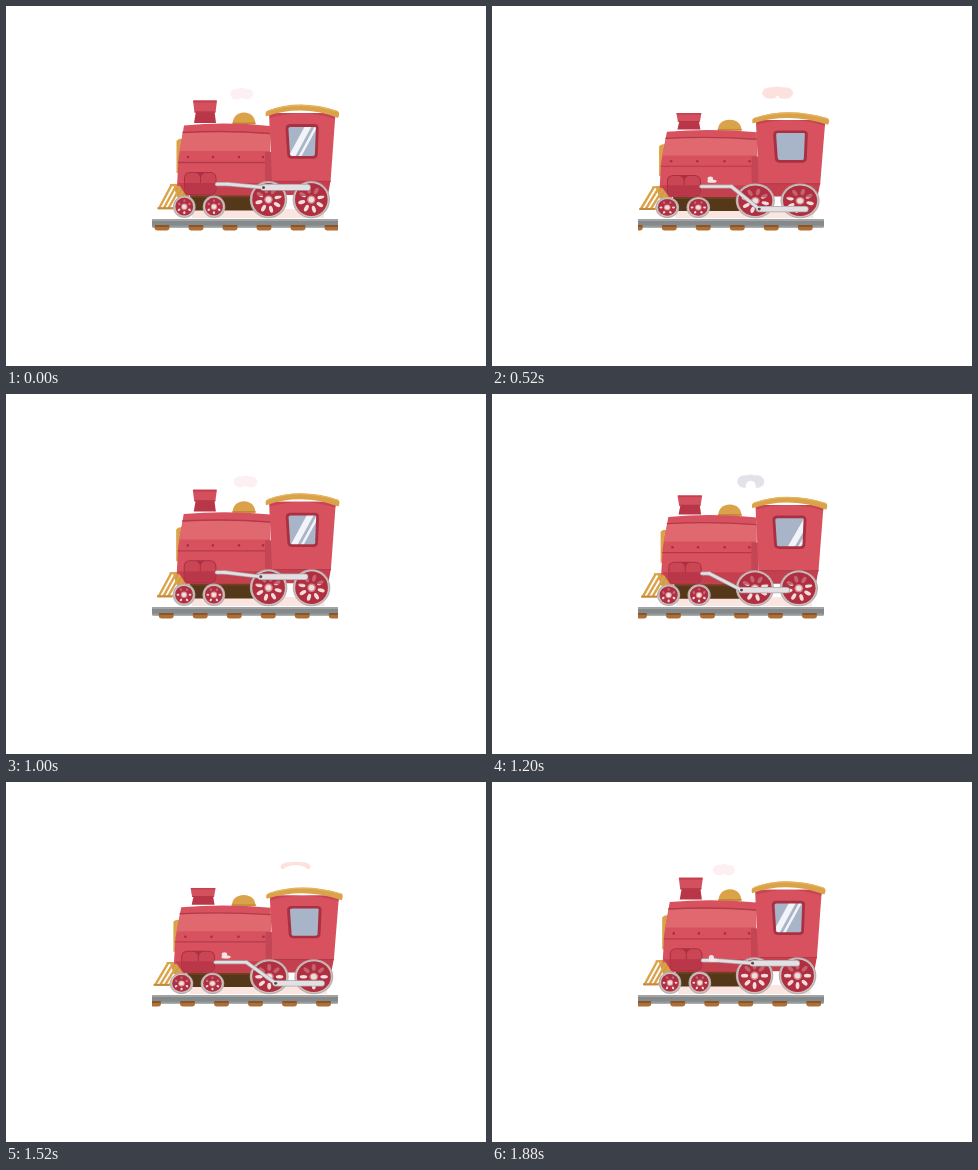
Recreate the animation shown at these times as an HTML page with a canvas. Size 480 by 360 pixels, loop 1920 ms.

```html
<!DOCTYPE html>
<html lang="en">
<head>
<meta charset="utf-8">
<title>Steam engine</title>
<style>
html, body { margin: 0; width: 100%; height: 100%; overflow: hidden; background: #fff; }
canvas { display: block; }
</style>
</head>
<body>
<canvas id="stage" width="480" height="360"></canvas>
<script>
const g = document.getElementById('stage').getContext('2d');
const CYCLE = 960, STEP = 40, TAU = Math.PI * 2;
const RED = '#d7525e', LIGHT = '#e0686f', DEEP = '#c4404f', DARK = '#a93042', GOLD = '#dba349';

function fill(d, color) {
  g.fillStyle = color;
  g.fill(new Path2D(d));
}

function stroke(d, color, width = 1, cap = 'butt') {
  g.strokeStyle = color;
  g.lineWidth = width;
  g.lineCap = cap;
  g.stroke(new Path2D(d));
}

function oval(x, y, rx, ry, color, turn = 0) {
  g.fillStyle = color;
  g.beginPath();
  g.ellipse(x, y, rx, ry, turn, 0, TAU);
  g.fill();
}

const dot = (x, y, r, color) => oval(x, y, r, r, color);

function box(x, y, w, h, r, color) {
  g.fillStyle = color;
  g.beginPath();
  g.roundRect(x, y, w, h, r);
  g.fill();
}

function group(draw) {
  g.save();
  draw();
  g.restore();
}

// Piecewise linear value through [time, value] pairs
function track(t, keys) {
  const i = keys.findIndex(k => k[0] >= t);
  if (i < 0) return keys[keys.length - 1][1];
  if (i === 0) return keys[0][1];
  const [a, u] = keys[i - 1], [b, v] = keys[i];
  return u + (v - u) * (t - a) / (b - a);
}

function rails(t) {
  box(146, 213, 186, 8.5, 1.5, '#848a8b');
  box(146, 213, 186, 2, 1, '#a2a4a5');
  box(146, 219.5, 186, 2, 1, '#969b9c');
  group(() => {
    g.beginPath();
    g.rect(146, 210, 186, 16);
    g.clip();
    const shift = (t / CYCLE * 102) % 34;
    for (let x = 122 + shift; x < 345; x += 34) {
      box(x - 7.5, 219, 15, 5.5, [0, 0, 3, 3], '#ad6f38');
      box(x - 7, 219, 14, 2, 0, '#8b5429');
    }
  });
}

function smoke(t) {
  const age = (t - 640 + CYCLE) % CYCLE;
  const x = 205 + age * 0.096;
  const y = track(age, [[0, 99], [160, 93], [280, 88], [840, 87], [880, 85], [960, 82]]);
  const w = track(age, [[0, 5], [160, 10], [320, 11.5], [560, 13.5], [840, 15.5], [960, 14]]);
  const h = track(age, [[0, 3], [160, 5.5], [560, 7], [840, 6.5], [960, 3]]);
  const color = age < 480 ? '#fcf0f2' : age < 720 ? '#e2e2ea' : '#fde1de';
  oval(x - w * 0.45, y, w * 0.55, h * 0.9, color);
  oval(x + w * 0.45, y, w * 0.55, h * 0.9, color);
  oval(x, y - h * 0.15, w * 0.55, h * 0.85, color);
  const hole = track(age, [[400, 0], [560, 5], [700, 3], [840, 1.5], [880, 12], [960, 14]]);
  if (hole > 0) oval(x, y + h * 0.6, hole, Math.min(hole, 5), '#fff');
  if (age > 860) box(x - 17, y + 2, 34, 9, 0, '#fff');
}

function wheel(x, y, r, turn, petals) {
  const big = r > 15;
  dot(x, y, r, '#b9adab');
  dot(x, y, r - 1, '#cbc0be');
  dot(x, y, r - 2.4, '#b02f41');
  for (let i = 0; i < petals; i++) {
    const a = turn + i * TAU / petals, d = r * 0.53;
    oval(x + d * Math.cos(a), y + d * Math.sin(a), big ? 3.6 : 1.4, big ? 1.9 : 1.1, '#f3dcdb', a);
  }
  // Shadow of the body on the upper half
  g.fillStyle = '#b02f41b0';
  g.beginPath();
  g.arc(x, y, r - 2.4, Math.PI * 1.07, Math.PI * 1.93);
  g.fill();
  dot(x, y, big ? 4.2 : 3.2, '#d58b8f');
  dot(x, y, big ? 2.8 : 2.3, '#f0dede');
}

function chimney(s) {
  group(() => {
    g.translate(199, 117);
    g.scale(1, 1 - 0.24 * s);
    g.translate(-199, -117);
    fill('M190 105H208.5L210 117H188Z', '#b83648');
    fill('M187 94.5H211L209.5 106.5H188.5Z', '#d4505e');
    stroke('M187.5 95.5H210.5', '#c4404f', 2);
    stroke('M188.5 106H209.5', DARK, 1);
  });
}

function boiler() {
  fill('M170.5 135Q173 132 176 133V167H170.5Z', GOLD);
  fill('M178 119.5Q220 115.5 264 120V180H171L172.5 152Z', RED);
  fill('M177 127Q220 124 264 128V145H173.5Z', LIGHT);
  stroke('M176.5 126.5Q220 124 264 127.5', '#b43a4a', 1.4);
  stroke('M172 156.5H264', '#b43a4a', 1.3);
  for (const x of [182, 207, 233, 257]) dot(x, 151, 1.3, DARK);
  fill('M172 177H265V189.5H180Z', DEEP);
  fill('M259 146H266V189H259Z', '#c44553');
}

function cab(t) {
  fill('M263 107H329.5L324.5 176H266Z', RED);
  fill('M264 107H329.5L329 113Q296 102 264 112Z', '#c84454');
  fill('M265 175H324.5L322 189H264Z', DEEP);
  stroke('M265 175.3H324.5', '#b43a4a', 1);
  fill('M260 110.5Q258.5 105.5 262 104.5Q294 92.5 331.5 105Q334.5 106.5 332 112Q296 98 260 110.5Z', GOLD);
  stroke('M262 104.8Q294 93.5 332 105.5', '#e6b866', 1);
  const pane = new Path2D('M284.5 119.5H308.5Q311.5 119.5 311.3 122.5L310.3 148.5Q310 151.3 307 151.3H286Q283 151.3 282.6 148.5L281 122.5Q281 119.5 284.5 119.5Z');
  group(() => {
    g.fillStyle = '#a8b5c8';
    g.fill(pane);
    g.clip(pane);
    const phase = t > 560 ? t - CYCLE : t;
    g.translate(phase * 0.05, 0);
    stroke('M284 154L304 117', '#f3f4f8', 6);
    stroke('M292 154L312 117', '#f3f4f8', 2.5);
  });
  g.strokeStyle = DARK;
  g.lineWidth = 2.8;
  g.stroke(pane);
}

function front() {
  fill('M167 178H183V191H171Z', '#d29a47');
  for (let i = 0; i < 4; i++)
    stroke(`M${165.5 + i * 5} 179L${153 + i * 4.7} 202.5`, GOLD, 2.4);
  stroke('M151.5 202.3H167', '#c58a3b', 2.2);
  stroke('M164 179H182', GOLD, 2.2);
}

function cylinder() {
  box(178, 166, 32.5, 23, 6, DARK);
  box(179, 167, 15, 21, 5, '#cb4655');
  box(195, 167, 14.5, 21, 5, '#cb4655');
  box(179, 177, 30.5, 11, [0, 0, 5, 5], '#b93748');
}

function rods(turn, t) {
  const cx = 260.5 + 11.5 * Math.cos(turn), cy = 192.5 - 11.5 * Math.sin(turn);
  const hy = 178.2, hx = cx - Math.sqrt(36 * 36 - (cy - hy) ** 2);
  const bars = [
    [`M211 ${hy}H${hx}`, 4.2],
    [`M${hx} ${hy}L${cx} ${cy}`, 4.2],
    [`M${cx} ${cy}H${cx + 44}`, 6.6]
  ];
  for (const [d, w] of bars) stroke(d, '#aaa3a7', w, 'round');
  for (const [d, w] of bars) stroke(d, '#e3e0e4', w - 1.5, 'round');
  dot(cx, cy, 1.5, '#574b50');
  if (t > 440) {
    const y = track(t, [[440, 170], [560, 170], [960, 176]]);
    dot(219.5, y, 2.6, '#f4e6e6');
    oval(221, y + 2.5, 4.5, 1.8, '#f4e6e6');
  }
}

function engine(t) {
  const s = 1 - Math.abs(t / CYCLE * 2 - 1);
  const turn = TAU * (105 / 360 + t / CYCLE);
  group(() => {
    g.translate(245, 212);
    g.scale(1 + 0.05 * s, 1 - 0.074 * s);
    g.translate(-245, -212);
    box(186, 203, 132, 9, 0, '#fae5e1');
    front();
    box(184, 188.5, 70, 16, 0, '#55371a');
    box(184, 188.5, 70, 3, 0, '#70401f');
    chimney(s);
    fill('M226.5 118.5Q227 107 238 106.5Q249 107 249.5 118.5Z', GOLD);
    stroke('M226.5 117.2H249.5', '#c18a35', 1.5);
    boiler();
    cab(t);
    cylinder();
    for (const x of [178.3, 208]) wheel(x, 200.7, 11.3, -turn * 2, 6);
    for (const x of [262.5, 305.3]) wheel(x, 193.6, 18.7, -turn, 8);
    rods(turn, t);
  });
}

function frame(now) {
  const t = Math.floor(now / STEP) * STEP % CYCLE;
  g.fillStyle = '#fff';
  g.fillRect(0, 0, 480, 360);
  smoke(t);
  rails(t);
  engine(t);
  requestAnimationFrame(() => frame(performance.now()));
}
frame(performance.now());
</script>
</body>
</html>
```
